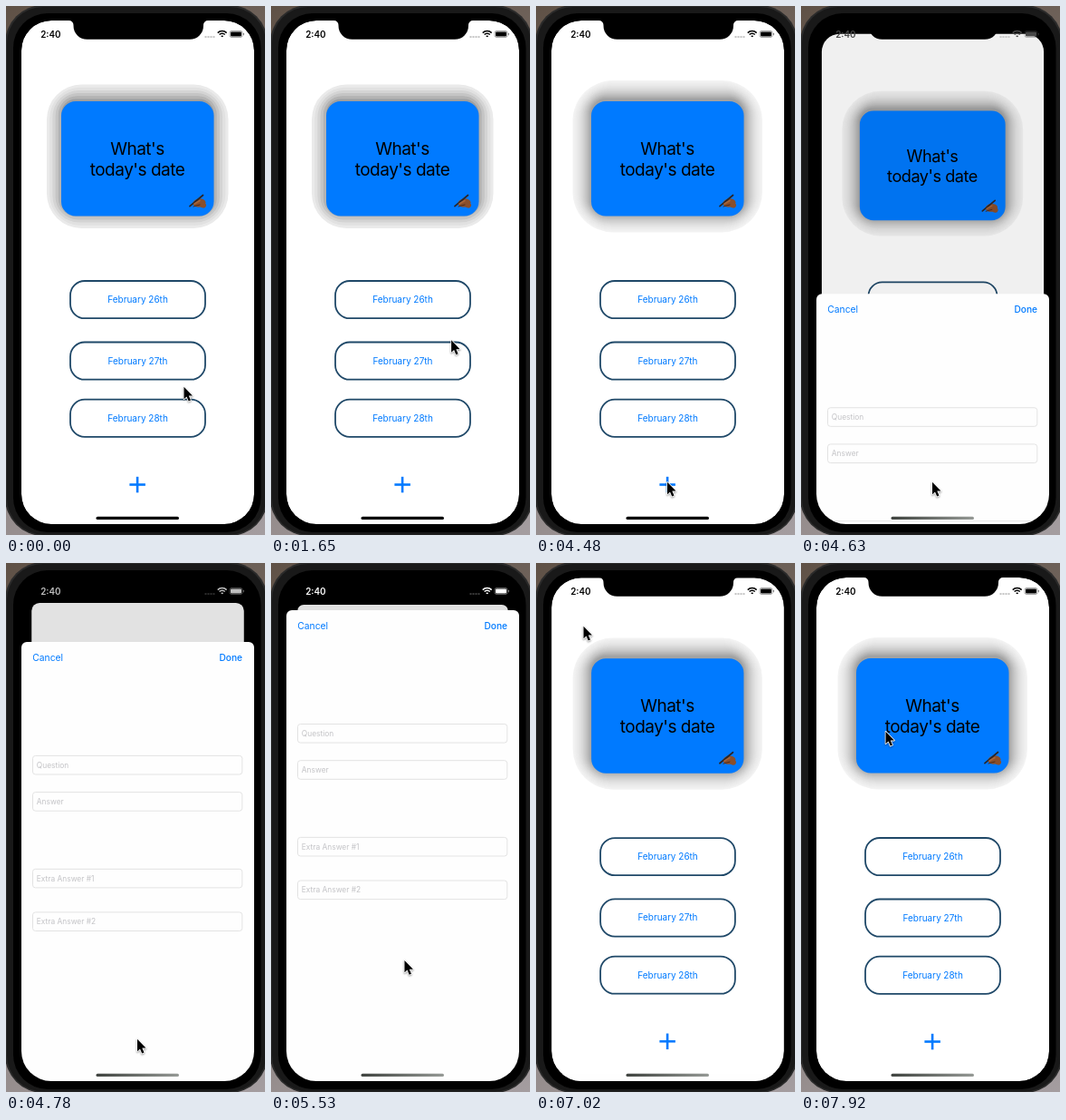
Write an HTML page with a canvas that moves like this. It is 286 by 583 pixels and loops after 8000 ms.

```html
<!DOCTYPE html>
<html lang="en">
<head>
<meta charset="utf-8">
<title>Flash card app</title>
<style>
  html, body { margin: 0; width: 100%; height: 100%; overflow: hidden; background: #000; }
  canvas { display: block; width: 100%; height: 100%; }
</style>
</head>
<body>
<canvas id="stage"></canvas>
<script>
const W = 286, H = 583, LOOP = 8000, STEP = 150;
const BLUE = '#007aff', NAVY = '#1f4868';
const SCREEN = { x: 17, y: 16, w: 257, h: 555, r: 33 };
const CARD = { x: 61, y: 105, w: 168.5, h: 126.5, r: 16 };
const MID = SCREEN.x + SCREEN.w / 2;
const PRESS = 4330, OPEN = 4540, CANCEL = 6570, CLOSE = 6686;
const canvas = document.getElementById('stage');
const ctx = canvas.getContext('2d');
const dpr = window.devicePixelRatio || 1;
canvas.width = W * dpr;
canvas.height = H * dpr;

// Each move bends from the previous resting point past `via` to `to`.
const REST = [196, 419];
const MOVES = [
  { start: 1350, end: 2250, via: [202, 370], to: [195, 334] },
  { start: 2850, end: 3880, via: [204, 523], to: [144.5, 524] },
  { start: 5530, end: 6570, via: [163, 282], to: [52, 69] },
  { start: 7620, end: 7920, via: [70, 120], to: [93, 185] }
];

const clamp = v => Math.max(0, Math.min(1, v));
const gray = v => { const g = Math.round(v); return `rgb(${g},${g},${g})`; };
const snap = (t, from) => from + Math.floor((t - from) / STEP) * STEP;
const easeOut = u => 1 - (1 - u) ** 1.5;
const bend = (a, b, c, u) => (1 - u) ** 2 * a + 2 * u * (1 - u) * b + u * u * c;

// Critically damped spring from 0 to 1.
function spring(ms) {
  if (ms <= 0) return 0;
  const k = ms * 0.01826;
  return 1 - (1 + k) * Math.exp(-k);
}

function pointerAt(t) {
  let from = REST;
  for (const { start, end, via, to } of MOVES) {
    if (t < start) break;
    const gaps = Math.round((end - start) / STEP);
    const done = Math.floor((t - start) / (end - start) * gaps + 0.05);
    const u = easeOut(clamp((done + 1) / (gaps + 1)));
    from = from.map((v, i) => bend(v, via[i], to[i], u));
  }
  return from;
}

function sheetState(t) {
  if (t < OPEN + 90) return { p: 0, level: 0 };
  if (t < CANCEL + STEP) {
    const age = snap(t, OPEN + 90) - OPEN;
    return { p: spring(age), level: clamp(age / 320) };
  }
  const age = snap(t, CANCEL + STEP) - CLOSE;
  return { p: 1 - spring(age), level: clamp(1 - age / 320) };
}

function box(x, y, w, h, r) {
  ctx.beginPath();
  ctx.roundRect(x, y, w, h, r);
}

function fillBox(x, y, w, h, r, color) {
  box(x, y, w, h, r);
  ctx.fillStyle = color;
  ctx.fill();
}

function strokeBox(x, y, w, h, r, color, width) {
  box(x, y, w, h, r);
  ctx.strokeStyle = color;
  ctx.lineWidth = width;
  ctx.stroke();
}

function line(x1, y1, x2, y2, color, width) {
  ctx.beginPath();
  ctx.moveTo(x1, y1);
  ctx.lineTo(x2, y2);
  ctx.strokeStyle = color;
  ctx.lineWidth = width;
  ctx.stroke();
}

function blob(x, y, rx, ry, turn, color) {
  ctx.beginPath();
  ctx.ellipse(x, y, rx, ry, turn, 0, 2 * Math.PI);
  ctx.fillStyle = color;
  ctx.fill();
}

function blend(x1, y1, x2, y2, from, to) {
  const g = ctx.createLinearGradient(x1, y1, x2, y2);
  g.addColorStop(0, from);
  g.addColorStop(1, to);
  return g;
}

function label(str, x, y, size, color, align = 'center', weight = 400, spacing = 0) {
  ctx.font = `${weight} ${size}px Inter, sans-serif`;
  ctx.letterSpacing = spacing + 'px';
  ctx.textAlign = align;
  ctx.fillStyle = color;
  ctx.fillText(str, x, y);
}

function drawPhone() {
  ctx.fillStyle = blend(0, 0, W, H, '#5f5146', '#a49da0');
  ctx.fillRect(0, 0, W, H);
  fillBox(-1, -1, 290, 585, 42, '#2b2b2b');
  fillBox(1, 1, 286, 581.5, 40, '#191919');
  fillBox(8, 8, 273.5, 572, 38, '#000');
}

// Nested rings fade outward; a coarse step gives visible bands.
function drawShadow(reach, step) {
  for (let d = reach; d >= 0; d -= step) {
    const shade = 255 * (1 - 0.75 / (1 + Math.exp(0.13 * d)));
    fillBox(CARD.x - d, CARD.y - d - 2.5, CARD.w + 2 * d, CARD.h + 2 * d, CARD.r + 1.4 * d, gray(shade));
  }
}

function drawHand() {
  ctx.lineCap = 'round';
  blob(213.5, 217, 7, 4.6, -0.1, '#8a4f2b');
  blob(217.5, 219.5, 3.6, 3, 0.3, '#8a4f2b');
  line(203, 220.6, 217.5, 208.5, '#2a2629', 1.8);
  line(207, 221, 214, 219, '#4f2c1a', 1);
  line(208, 218, 214, 214.5, '#a86437', 1.6);
}

function drawHome(t, p) {
  const pressed = t >= PRESS;
  const scale = 1 - 0.094 * p;
  const r = SCREEN.r - 25 * p;
  ctx.save();
  ctx.translate(MID, SCREEN.y + 30 * p);
  ctx.scale(scale, scale);
  ctx.translate(-MID, -SCREEN.y);
  fillBox(SCREEN.x, SCREEN.y, SCREEN.w, SCREEN.h, r, '#fff');
  if (pressed) drawShadow(20.5, 1);
  else drawShadow(16, 3.2);
  fillBox(CARD.x, CARD.y, CARD.w, CARD.h, CARD.r, BLUE);
  label("What's", 145, 164, 19, '#000', 'center', 400, -0.5);
  label("today's date", 145, 187, 19, '#000', 'center', 400, -0.5);
  drawHand();
  [303, 370.5, 433.7].forEach((y, i) => {
    strokeBox(71, y, 149, 41.2, 16, NAVY, 1.8);
    label(`February ${26 + i}th`, 145.5, y + 24, 10, BLUE);
  });
  ctx.globalAlpha = pressed && t < PRESS + STEP ? 0.3 : 1;
  ctx.fillStyle = BLUE;
  ctx.fillRect(136.4, 526.2, 17.5, 2.6);
  ctx.fillRect(143.8, 518.8, 2.6, 17.5);
  ctx.globalAlpha = 1;
  fillBox(SCREEN.x, SCREEN.y, SCREEN.w, SCREEN.h, r, `rgba(0,0,0,${0.12 * p})`);
  ctx.restore();
}

function drawSheet(t, p) {
  const top = 571 - 519 * p;
  fillBox(SCREEN.x, top, SCREEN.w, H, 6, '#fefefe');
  ctx.globalAlpha = t >= CANCEL ? 0.27 : 1;
  label('Cancel', 29.3, top + 21, 10.3, BLUE, 'left');
  ctx.globalAlpha = 1;
  label('Done', 261, top + 21, 10.2, BLUE, 'right', 500);
  const fields = { 'Question': 125.5, 'Answer': 165.7, 'Extra Answer #1': 250.4, 'Extra Answer #2': 298 };
  for (const [name, dy] of Object.entries(fields)) {
    strokeBox(29.5, top + dy, 231.3, 20.6, 3, '#e0e0e0', 0.9);
    label(name, 33.8, top + dy + 13.4, 8.4, '#c3c3c6', 'left');
  }
}

function drawNotch() {
  const left = 74.5, right = 218, top = SCREEN.y, bottom = 36.8;
  ctx.beginPath();
  ctx.moveTo(left - 5, top - 1);
  ctx.lineTo(left - 5, top);
  ctx.arcTo(left, top, left, bottom, 5);
  ctx.arcTo(left, bottom, right, bottom, 15);
  ctx.arcTo(right, bottom, right, top, 15);
  ctx.arcTo(right, top, right + 5, top, 5);
  ctx.lineTo(right + 5, top - 1);
  ctx.fillStyle = '#000';
  ctx.fill();
}

function drawStatus(level) {
  const color = gray(255 * level);
  label('2:40', 38.2, 34.8, 9.9, color, 'left', 600);
  ctx.globalAlpha = 0.35;
  for (let i = 0; i < 4; i++) ctx.fillRect(219.5 + 3 * i, 33.4, 2, 1.3);
  ctx.globalAlpha = 1;
  ctx.strokeStyle = color;
  ctx.lineCap = 'butt';
  ctx.lineWidth = 1.5;
  for (const r of [7, 4.4, 1.4]) {
    ctx.beginPath();
    ctx.arc(238.7, 34.6, r, -Math.PI * 0.75, -Math.PI * 0.25);
    ctx.stroke();
  }
  ctx.globalAlpha = 0.5;
  strokeBox(247, 27.5, 14, 7, 2, color, 0.7);
  fillBox(261.8, 29.8, 1, 2.4, 0.5, color);
  ctx.globalAlpha = 1;
  fillBox(248, 28.5, 12, 5, 1, color);
}

function drawBar(t) {
  const color = t < OPEN + 90 ? '#000' : blend(99, 0, 191, 0, '#3f433f', '#959995');
  fillBox(99.5, 562.8, 91.5, 3.2, 1.6, color);
}

function drawPointer(t) {
  ctx.save();
  ctx.translate(...pointerAt(t));
  ctx.lineJoin = 'round';
  ctx.shadowColor = 'rgba(0,0,0,0.4)';
  ctx.shadowBlur = 2 * dpr;
  ctx.shadowOffsetY = dpr;
  const arrow = new Path2D('M.5 .8V14.2L3.5 11.4L5.7 16.6L8 15.6L5.8 10.6H10Z');
  ctx.strokeStyle = '#fff';
  ctx.lineWidth = 1.6;
  ctx.stroke(arrow);
  ctx.shadowColor = 'transparent';
  ctx.fillStyle = '#000';
  ctx.fill(arrow);
  ctx.restore();
}

function draw(t) {
  const { p, level } = sheetState(t);
  ctx.setTransform(dpr, 0, 0, dpr, 0, 0);
  drawPhone();
  ctx.save();
  box(SCREEN.x, SCREEN.y, SCREEN.w, SCREEN.h, SCREEN.r);
  ctx.clip();
  drawHome(t, p);
  if (p > 0.002) drawSheet(t, p);
  drawNotch();
  drawStatus(level);
  drawBar(t);
  ctx.restore();
  drawPointer(t);
}

const start = performance.now();
function tick() {
  draw((performance.now() - start) % LOOP);
  requestAnimationFrame(tick);
}
tick();
</script>
</body>
</html>
```
